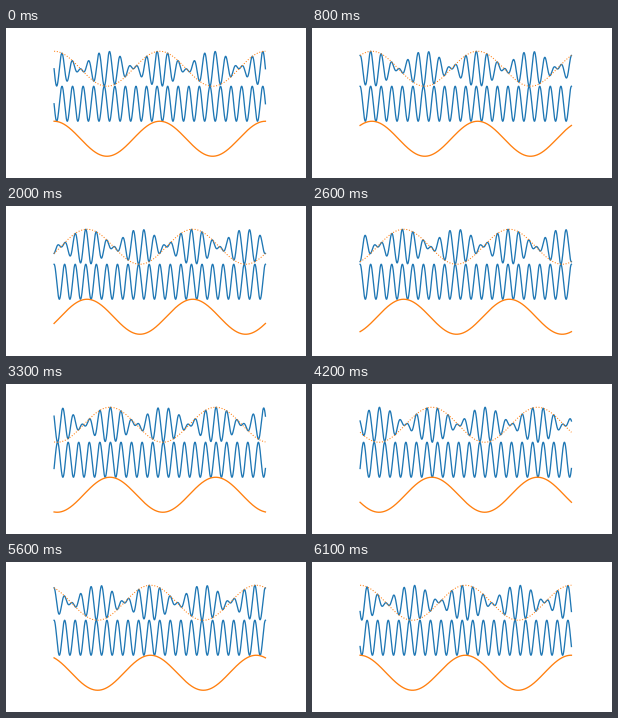
A matplotlib script for the animation above (6.2 s loop, 300 px wide and 150 px high).

```python
import numpy as np
import matplotlib.pyplot as plt
from matplotlib.animation import FuncAnimation

FRAMES = 62
INTERVAL = 100
HOLD = 1.25   # rest before the waves start, in frames
CYCLE = 60    # frames per period of the slow wave
LIFT = 2      # vertical spacing between the curves

x = np.linspace(0, 4 * np.pi, 1000)

fig, ax = plt.subplots(figsize=(6, 3), dpi=50)
ax.set_axis_off()
ax.set_xlim(-0.05 * x[-1], 1.05 * x[-1])
ax.set_ylim(-3.3, 3.3)


def add_line(color, style="-", width=1.9):
    return ax.plot([], [], style, color=color, lw=width)[0]


product = add_line("C0")
carrier = add_line("C0")
signal = add_line("C1")
envelope = add_line("C1", ":", 1.5)


def update(i):
    t = 2 * np.pi * max(0, i - HOLD) / CYCLE
    slow = np.cos(t - x)
    fast = np.sin(20 * t - 10 * x)
    product.set_data(x, slow * fast + LIFT)
    carrier.set_data(x, fast)
    signal.set_data(x, slow - LIFT)
    envelope.set_data(x, slow + LIFT)
    return product, carrier, signal, envelope


anim = FuncAnimation(fig, update, frames=FRAMES, interval=INTERVAL,
                     repeat=True, repeat_delay=0)
plt.show()
```
